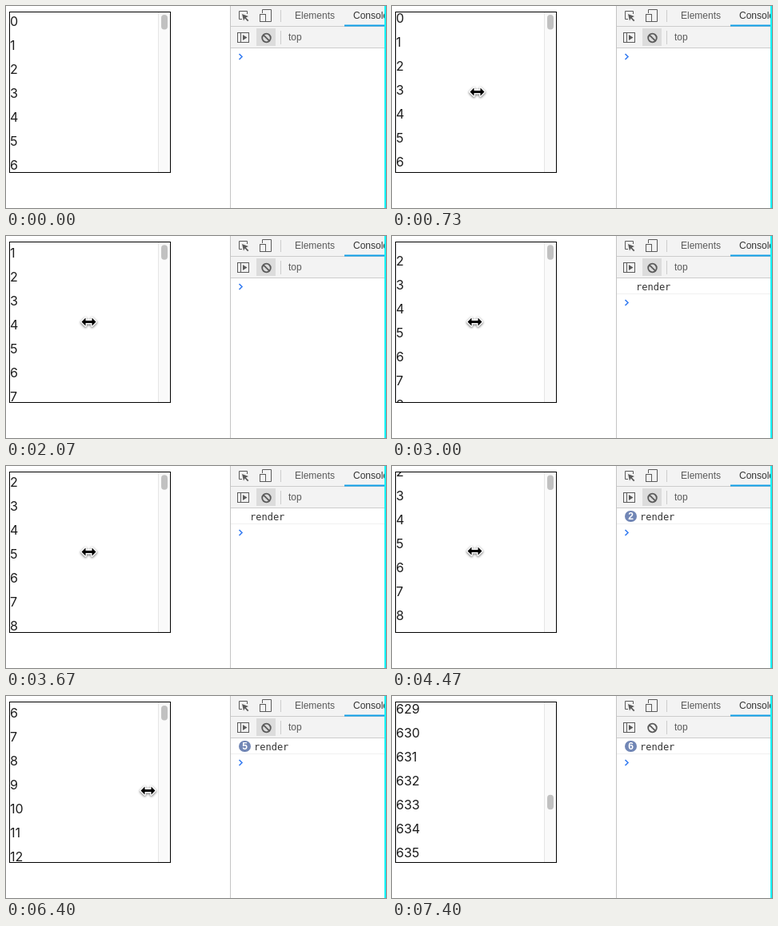
Write an HTML page with a canvas that moves like this. It is 475x253 px and loops after 7790 ms.

```html
<!DOCTYPE html>
<html lang="en">
<head>
<meta charset="utf-8">
<title>Virtual list</title>
<style>
html, body { margin: 0; width: 100%; height: 100%; overflow: hidden; background: #fff; }
canvas { display: block; width: 475px; height: 253px; }
</style>
</head>
<body>
<canvas id="stage"></canvas>
<script>
const W = 475, H = 253, LOOP = 7790, ROW = 30, FRAME = 1000 / 15;
const canvas = document.getElementById('stage');
const ctx = canvas.getContext('2d');
const dpr = window.devicePixelRatio || 1;
canvas.width = W * dpr;
canvas.height = H * dpr;

const SANS = '"Liberation Sans", Arial, sans-serif';
const MONO = '"DejaVu Sans Mono", monospace';
const LIST = 'Inter, sans-serif';
const ICON = '#5a5a5a';

// key points, times in frames: slow wheel scrolling, then a drag of the thumb
const scrollKeys = [
  [9, 0], [11, 4], [16, 10], [31, 28], [45, 48], [67, 72], [71, 79],
  [78, 105], [85, 112], [90, 154], [95, 178], [102, 178], [103, 18873]
];
const pointerKeys = [
  [1, 191, 227], [9, 106, 107], [15, 106, 107], [16, 103, 107], [45, 103, 107],
  [67, 103, 106], [92, 103, 107], [96, 177, 118], [100, 203, 24],
  [102, 203, 24], [103, 205, 131], [108, 205, 131], [110, 285, 131]
];
const ENTER = 1, DRAG = 103, LEAVE = 111;

// straight interpolation between key points, in whole pixels
function along(keys, f) {
  const next = keys.findIndex(k => k[0] > f);
  if (next < 0) return keys[keys.length - 1].slice(1);
  if (next === 0) return keys[0].slice(1);
  const a = keys[next - 1], b = keys[next];
  const k = (f - a[0]) / (b[0] - a[0]);
  return a.slice(1).map((v, i) => Math.round(v + (b[i + 1] - v) * k));
}

function rect(x, y, w, h, color) {
  ctx.fillStyle = color;
  ctx.fillRect(x, y, w, h);
}

function pill(x, y, w, h, color) {
  ctx.fillStyle = color;
  ctx.beginPath();
  ctx.roundRect(x, y, w, h, Math.min(w, h) / 2);
  ctx.fill();
}

function text(str, x, y, font, color, align = 'left') {
  ctx.font = font;
  ctx.fillStyle = color;
  ctx.textAlign = align;
  ctx.fillText(str, x, y);
}

function trace(points) {
  ctx.beginPath();
  points.forEach(([x, y]) => ctx.lineTo(x, y));
}

function line(points, color, width = 1) {
  trace(points);
  ctx.strokeStyle = color;
  ctx.lineWidth = width;
  ctx.stroke();
}

function shape(points, color) {
  trace(points);
  ctx.closePath();
  ctx.fillStyle = color;
  ctx.fill();
}

function outline(x, y, w, h, color) {
  ctx.strokeStyle = color;
  ctx.lineWidth = 1;
  ctx.strokeRect(x + 0.5, y + 0.5, w - 1, h - 1);
}

function drawList(scroll) {
  outline(4, 7, 202, 202, '#000');
  ctx.save();
  ctx.beginPath();
  ctx.rect(5, 8, 200, 200);
  ctx.clip();
  const first = Math.floor(scroll / ROW);
  for (let i = first; i < first + 9; i++) {
    text(i, 5, 25 + i * ROW - scroll, '16px ' + LIST, '#1c1c1c');
  }
  rect(190, 8, 15, 200, '#fafafa');
  rect(190, 8, 1, 200, '#e6e6e6');
  const thumb = 11 + scroll / (1000 * ROW - 200) * 178;
  pill(194, thumb, 8, 18.5, '#c1c1c1');
  ctx.restore();
}

function drawInspectIcon() {
  line([[295, 16.5], [291.5, 16.5], [291.5, 6.5], [301.5, 6.5], [301.5, 10]], ICON);
  shape([[295, 10], [303, 13], [299.8, 14.4], [303.4, 18], [302, 19.2], [298.6, 15.6], [297, 18.6]], ICON);
}

function drawDeviceIcon() {
  line([[320.5, 9], [320.5, 4.5], [331.5, 4.5], [331.5, 19.5], [325, 19.5]], ICON);
  outline(317, 10, 8, 10, ICON);
}

function drawSidebarIcon() {
  outline(289, 33, 15, 13, ICON);
  rect(293, 33, 1, 13, ICON);
  shape([[296, 36], [301.5, 39.5], [296, 43]], ICON);
}

function drawClearIcon(hover) {
  if (hover) rect(313, 28, 24, 22, '#dcdcdc');
  ctx.beginPath();
  ctx.arc(325.5, 40, 5.3, 0, Math.PI * 2);
  ctx.strokeStyle = ICON;
  ctx.lineWidth = 1.8;
  ctx.stroke();
  line([[321.8, 36.3], [329.2, 43.7]], ICON, 1.8);
}

function drawToolbars(hover) {
  rect(281, 0, W - 281, 52, '#f3f3f3');
  rect(281, 25, W - 281, 1, '#cccccc');
  rect(281, 52, W - 281, 1, '#cccccc');
  rect(280, 0, 1, H, '#c4c4c4');
  drawInspectIcon();
  drawDeviceIcon();
  drawSidebarIcon();
  drawClearIcon(hover);
  rect(343, 5, 1, 15, '#cccccc');
  rect(343, 31, 1, 17, '#cccccc');
  text('Elements', 361, 16, '12px ' + SANS, '#5a5a5a');
  text('Console', 434, 16, '12px ' + SANS, '#333');
  text('top', 353, 43, '12px ' + SANS, '#5a5a5a');
  rect(423, 23.5, 50, 2, '#0f9fe8');
}

function drawConsole(count) {
  if (count > 0) {
    text('render', count > 1 ? 310 : 305, 68, '12px ' + MONO, '#303030');
    rect(281, 72, W - 281, 1, '#f0f0f0');
  }
  if (count > 1) {
    pill(291, 56, 15, 14, '#7186b5');
    text(count, 298.5, 67, 'bold 12px ' + SANS, '#fff', 'center');
  }
  const y = count > 0 ? 83.5 : 63.5;
  line([[291.5, y - 3.5], [295, y], [291.5, y + 3.5]], '#367cf1', 1.6);
  rect(473, 0, 2, H, '#10f4f8');
}

function drawPointer(x, y) {
  const half = [[-9, 0], [-4, -5], [-4, -1.5], [4, -1.5], [4, -5], [9, 0]];
  const mirrored = half.slice(1, 5).reverse().map(([a, b]) => [a, -b]);
  ctx.save();
  ctx.translate(x + 0.5, y + 0.5);
  ctx.lineJoin = 'round';
  trace(half.concat(mirrored));
  ctx.closePath();
  ctx.shadowColor = 'rgba(0,0,0,0.6)';
  ctx.shadowBlur = 3 * dpr;
  ctx.shadowOffsetY = dpr;
  ctx.strokeStyle = '#fff';
  ctx.lineWidth = 2.8;
  ctx.stroke();
  ctx.shadowColor = 'transparent';
  ctx.fillStyle = '#000';
  ctx.fill();
  ctx.restore();
}

function draw(t) {
  // small allowance for times rounded down to 10 ms
  const f = Math.floor((t + 4) / FRAME);
  ctx.setTransform(dpr, 0, 0, dpr, 0, 0);
  rect(0, 0, W, H, '#fff');
  const [scroll] = along(scrollKeys, f);
  drawList(scroll);
  drawToolbars(f < DRAG);
  // one render per new first row; the long drag counts once
  drawConsole(Math.min(6, Math.floor(scroll / ROW)));
  if (f >= ENTER && f < LEAVE) drawPointer(...along(pointerKeys, f));
}

const start = performance.now();
function tick() {
  draw((performance.now() - start) % LOOP);
  requestAnimationFrame(tick);
}
tick();
</script>
</body>
</html>
```
